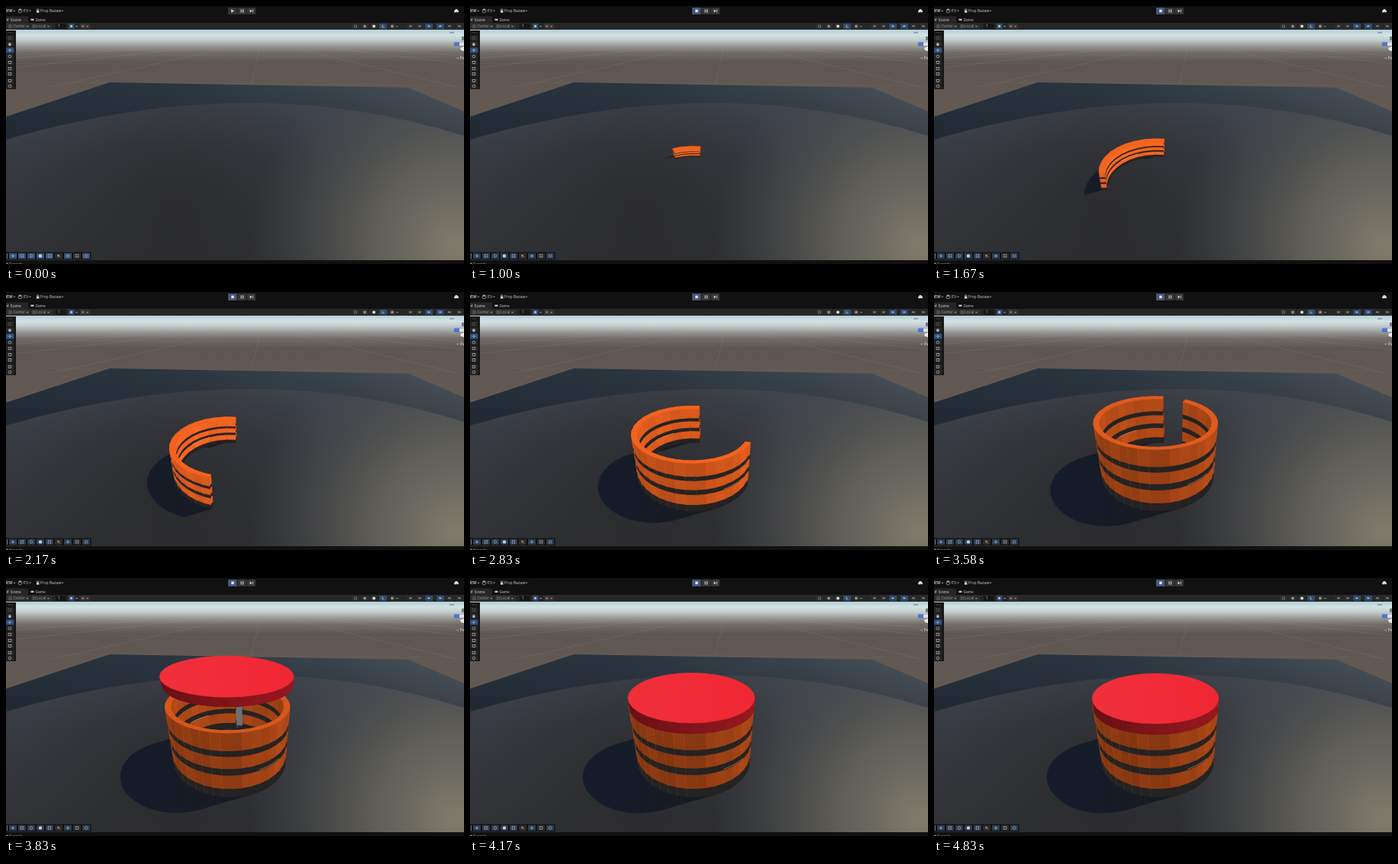
Write an HTML page with a canvas that moves like this. It is 600 px wide and 338 px high and loops after 5000 ms.

```html
<!DOCTYPE html>
<html lang="en">
<head>
<meta charset="utf-8">
<title>Ring builder</title>
<style>
  html, body { margin: 0; width: 100%; height: 100%; overflow: hidden; background: #111; }
  canvas { display: block; width: 600px; height: 338px; }
</style>
</head>
<body>
<canvas id="stage" width="600" height="338"></canvas>
<script>
const ctx = document.getElementById('stage').getContext('2d');
const LOOP = 5000, STEP = 1000 / 12, RAD = Math.PI / 180;
const BUILD_AT = 296, BUILD_FOR = 3912, LID_FROM = .9;
const START = -7;
const BANDS = [0, .29, .38, .57, .67, .88, 1];
const mix = (a, b, p) => a + (b - a) * p;
const clamp = v => Math.max(0, Math.min(1, v));
const ease = p => (1 - Math.cos(Math.PI * clamp(p))) / 2;
const rgb = (c, m = 1) => `rgb(${c.map(v => Math.round(v * m)).join()})`;

function rect(color, x, y, w, h) {
  ctx.fillStyle = color;
  ctx.fillRect(x, y, w, h);
}

function poly(color, points, seam = true) {
  ctx.beginPath();
  points.forEach(p => ctx.lineTo(p[0], p[1]));
  ctx.closePath();
  ctx.fillStyle = color;
  ctx.fill();
  if (seam) {
    ctx.strokeStyle = color;
    ctx.lineWidth = .5;
    ctx.stroke();
  }
}

function line(color, width, ...points) {
  ctx.strokeStyle = color;
  ctx.lineWidth = width;
  ctx.beginPath();
  points.forEach(p => ctx.lineTo(p[0], p[1]));
  ctx.stroke();
}

function dot(color, x, y, r) {
  ctx.fillStyle = color;
  ctx.beginPath();
  ctx.arc(x, y, r, 0, 7);
  ctx.fill();
}

function label(text, x, y, size = 5, color = '#c4c4c4', weight = 400) {
  ctx.font = `${weight} ${size}px Inter, Roboto, sans-serif`;
  ctx.fillStyle = color;
  ctx.fillText(text, x, y);
}

function fade(gradient, stops) {
  stops.forEach(([at, color]) => gradient.addColorStop(at, color));
  return gradient;
}

const caret = (x, y) => poly('#999', [[x, y], [x + 3, y], [x + 1.5, y + 1.8]], false);

function scenery() {
  rect(fade(ctx.createLinearGradient(0, 31, 0, 110), [
    [0, '#b4cfd5'], [.09, '#d3e3e5'], [.17, '#c3cdcd'], [.27, '#999a97'],
    [.38, '#716c68'], [.54, '#5d5652'], [1, '#625953']]), 0, 31, 600, 150);

  for (const x of [-520, -220, 60, 320, 590, 860, 1130])
    line('rgba(160,155,148,.25)', .7, [mix(x, 335, .82), 56], [x, 106]);
  for (const y of [64, 76, 101]) line('rgba(160,155,148,.13)', .6, [0, y - 1], [600, y + 3]);

  const plane = [[0, 145], [136, 100], [527, 107], [600, 138], [600, 200], [0, 200]];
  poly(fade(ctx.createLinearGradient(0, 0, 600, 0), [
    [0, '#26313c'], [.35, '#2b3540'], [.75, '#3c464f'], [1, '#4e555c']]), plane, false);
  poly(fade(ctx.createLinearGradient(0, 100, 0, 165), [
    [0, 'rgba(24,32,42,0)'], [1, 'rgba(20,26,36,.3)']]), plane, false);

  ctx.save();
  ctx.beginPath();
  ctx.moveTo(0, 175);
  ctx.quadraticCurveTo(320, 81.5, 600, 170);
  ctx.lineTo(600, 338);
  ctx.lineTo(0, 338);
  ctx.clip();
  rect(fade(ctx.createLinearGradient(0, 125, 0, 335), [
    [0, '#40454d'], [.35, '#373a40'], [1, '#303134']]), 0, 120, 600, 218);
  rect(fade(ctx.createRadialGradient(225, 270, 10, 225, 270, 210), [
    [0, 'rgba(40,40,42,.7)'], [1, 'rgba(40,40,42,0)']]), 0, 120, 600, 218);
  rect(fade(ctx.createRadialGradient(590, 315, 10, 590, 315, 270), [
    [0, 'rgba(130,125,108,.95)'], [.4, 'rgba(112,109,99,.7)'],
    [.75, 'rgba(88,89,88,.35)'], [1, 'rgba(80,82,84,0)']]), 0, 120, 600, 218);
  ctx.restore();
}

// Point on the ring: angle from the back going left, height 0..1, radius
function spot(deg, k, r = 1) {
  const a = deg * RAD;
  return [mix(293, 290, k) - mix(73, 82, k) * r * Math.sin(a),
          mix(240, 167, k) - mix(47, 34, k) * r * Math.cos(a)];
}

function wall(a, b, ra, rb, top, tint, shade) {
  for (let i = 0; i < 6; i++) {
    const hi = top * (1 - BANDS[i]), lo = top * (1 - BANDS[i + 1]);
    poly(i % 2 ? '#242222' : rgb(tint, shade),
      [spot(a, hi, ra), spot(b, hi, rb), spot(b, lo, rb), spot(a, lo, ra)]);
  }
}

function segment([a, b], top, light, end) {
  const tint = [242, 100, 32];
  const mid = (a + b) / 2, c = Math.cos(mid * RAD), s = Math.sin(mid * RAD);
  const ripple = Math.sin(mid * 2.7) * .025;
  const inner = () => wall(a, b, .91, .91, top, tint, light + .1 + ripple + .05 * s);
  const outer = () => {
    wall(a, b, 1, 1, top, tint, light + ripple + Math.max(0, -s) * .15);
    line('rgba(255,150,60,.22)', .5, spot(a, top), spot(a, 0));
  };
  const cap = () => wall(b, b, 1, .91, top, tint, light + .05);
  const last = b === end && end < 360 + START;
  if (last && mid > 180) cap();
  if (c > 0) { outer(); inner(); } else { inner(); outer(); }
  poly(rgb(tint, mix(.65, 1, light)),
    [spot(a, top), spot(b, top), spot(b, top, .91), spot(a, top, .91)]);
  poly(rgb(tint, Math.min(1, light + .3)),
    [spot(a, top), spot(b, top), spot(b, top, .91), spot(a, top, .91)]);
  if (last && mid <= 180) cap();
}

function glint(from, to, k, r, end) {
  const pts = [];
  for (let a = from; a <= Math.min(to, end); a += 4) pts.push(spot(a, k, r));
  if (pts.length > 1) line('rgba(255,190,140,.55)', .8, ...pts);
}

function barrel(u) {
  const grown = ease(u), rise = mix(.1, 1, grown);
  const top = rise * mix(.87, 1, rise), end = START + 360 * grown;
  const light = mix(.92, .56, grown ** 3), parts = [];
  for (let a = START; a < end - .01; a += 10) parts.push([a, Math.min(a + 10, end)]);

  const drift = ([x, y]) => [x - 72 * top, y + 21 * top];
  const dark = fade(ctx.createLinearGradient(150, 0, 300, 0), [[0, '#141c2b'], [1, '#171a22']]);
  for (const [a, b] of parts) {
    const p = spot(a, 0), q = spot(b, 0);
    poly(dark, [p, q, drift(q), drift(p)]);
  }

  // Lit ground behind the closing gap
  if (u >= LID_FROM) rect('#6b7176', 299, 166, 14, 27);
  const depth = p => Math.cos((p[0] + p[1]) / 2 * RAD);
  parts.sort((p, q) => depth(q) - depth(p));
  parts.filter(p => depth(p) > 0).forEach(p => segment(p, top, light, end));
  glint(22, 46, top * .33, .91, end);
  parts.filter(p => depth(p) <= 0).forEach(p => segment(p, top, light, end));
  glint(212, 242, top * .35, 1, end);
}

function ring(cx, cy, rx, ry) {
  return Array.from({ length: 32 }, (_, i) => {
    const a = i / 32 * 2 * Math.PI;
    return [cx + rx * Math.cos(a), cy + ry * Math.sin(a)];
  });
}

function lid(u) {
  const p = ease((u - LID_FROM) / (1 - LID_FROM));
  const upper = ring(mix(289, 290, p), mix(129, 158, p), mix(88, 83, p), mix(27, 33, p));
  const lower = ring(mix(290, 290.5, p), mix(141, 171, p), mix(85.5, 81.5, p), mix(27.5, 34, p));
  poly('#7d141b', lower);
  for (let i = 0; i < 16; i++)
    poly(rgb([150, 24, 31], .84 + .16 * Math.cos(i * .2)),
      [upper[i], upper[i + 1], lower[i + 1], lower[i]]);
  poly(fade(ctx.createLinearGradient(200, 0, 378, 0), [[0, '#f0303b'], [1, '#f02733']]), upper);
}

function topBar(playing) {
  rect('#111', 0, 0, 600, 31);
  rect('#262626', 0, 13.5, 29, 9);
  rect('#262626', 0, 22, 600, 9);
  label('IEW', 0, 8.3, 4.6, '#ccc', 600);
  caret(9.5, 5.8);
  dot('#ccc', 18.5, 5, 1.1);
  ctx.strokeStyle = '#ccc';
  ctx.lineWidth = .6;
  ctx.beginPath();
  ctx.arc(18.5, 6.3, 2.5, 0, 7);
  ctx.stroke();
  label('EV', 23, 8.3);
  caret(30, 5.8);
  rect('#ccc', 40, 5.5, 3.4, 3.2);
  line('#ccc', .6, [40.6, 5.5], [40.6, 4], [42.8, 4], [42.8, 5.5]);
  label('Prop Bazaar', 45, 8.3, 4.8);
  caret(72.5, 5.8);

  rect('#353535', 291, 2, 36, 9);
  if (playing) {
    rect('#40597a', 291, 2, 11.5, 9);
    rect('#e2e8ee', 295.2, 4.7, 3.5, 3.5);
  } else poly('#d0d0d0', [[295, 4.2], [295, 8.8], [299, 6.5]], false);
  rect('#d0d0d0', 307.5, 4.4, 1.2, 4.2);
  rect('#d0d0d0', 310, 4.4, 1.2, 4.2);
  poly('#d0d0d0', [[319.5, 4.4], [319.5, 8.6], [322.5, 6.5]], false);
  rect('#d0d0d0', 322.8, 4.4, .9, 4.2);
  rect('#111', 302.6, 2, .6, 9);
  rect('#111', 314.8, 2, .6, 9);
  dot('#ddd', 588.5, 7, 1.5);
  dot('#ddd', 590, 6, 2);
  dot('#ddd', 591.6, 7, 1.4);

  label('#', .8, 19.6, 4.8);
  label('Scene', 5.5, 19.6, 4.8, '#d4d4d4');
  rect('#bbb', 32.5, 16.7, 4, 2.4);
  label('Game', 38.5, 19.6, 4.8);

  rect('#303030', 1, 23, 30, 7);
  rect('#303030', 33, 23, 27, 7);
  ctx.strokeStyle = '#888';
  ctx.lineWidth = .6;
  ctx.strokeRect(4, 25, 3, 3);
  label('Center', 9.5, 28.4, 4.8, '#959595');
  caret(26.5, 26);
  ctx.strokeStyle = '#888';
  ctx.strokeRect(35.5, 25, 3, 3);
  label('Local', 40, 28.4, 4.8, '#959595');
  caret(54, 26);
  rect('#171717', 65, 23.4, 14, 6.4);
  label('1', 68, 28.4, 4.8, '#aaa');
  rect('#2f4a70', 82, 23, 7.5, 7);
  rect('#9fb2cb', 84, 25, 3, 3);
  caret(91, 26);
  rect('#333', 97, 23, 13, 7);
  rect('#95604f', 99, 25, 3.2, 3);
  caret(105, 26);
  for (const x of [458, 470, 482, 494, 506, 530, 542, 554, 569, 581, 594]) {
    const blue = x === 494 || x === 554 || x === 569;
    rect(blue ? '#2f4a70' : '#2c2c2c', x - 5, 23, 10, 7);
    if (x < 510) dot(x === 482 ? '#ddd' : '#8c8c8c', x, 26.5, 2);
    else rect(blue ? '#9fb2cb' : '#858585', x - 1.8, 25.5, 3.4, 1.8);
  }
  dot('#2c2c2c', 458, 26.5, 1.3);
  dot('#2f4a70', 495, 25.8, 1.3);
  caret(511, 26);
}

function cross(x, y, color) {
  line(color, .8, [x - 2.4, y], [x + 2.4, y]);
  line(color, .8, [x, y - 2.4], [x, y + 2.4]);
}

function icon(i, x, y, color) {
  ctx.strokeStyle = color;
  ctx.lineWidth = .7;
  if (i % 3 === 0) cross(x, y, color);
  else if (i % 3 === 1) ctx.strokeRect(x - 1.8, y - 1.6, 3.6, 3.2);
  else {
    ctx.beginPath();
    ctx.arc(x, y, 1.8, 0, 7);
    ctx.stroke();
  }
}

function overlays(t) {
  rect('#151515', 0, 32, 13, 77);
  line('#555', .6, [2, 35], [9, 35]);
  [42, 50, 58, 66, 74, 82, 89, 98, 105].forEach((y, i) => {
    rect(i === 2 ? '#29507f' : '#262626', 0, y - 3.6, 10.5, 7);
    if (i === 1) {
      dot('#b5b5b5', 5, y + .6, 1.8);
      line('#b5b5b5', .7, [4, y], [4, y - 2.2]);
      line('#b5b5b5', .7, [5.8, y], [5.8, y - 2.4]);
    } else icon([1, 0, 0, 2, 1, 1, 1, 1, 2][i], 5, y, i ? '#b5b5b5' : '#555');
  });

  rect('#101010', 0, 322.5, 111.5, 9.5);
  for (let i = 0; i < 9; i++) {
    const x = 9 + i * 12, off = i === 5 || i === 7;
    rect(off ? '#2d2d2d' : t < 100 ? '#36527a' : '#2b3d55', x - 5, 323.7, 10, 7.4);
    if (i === 3) dot('#c5ccd4', x, 327.4, 2.2);
    else if (i === 5) {
      dot(t < 100 ? '#999' : '#a08060', x - .4, 327, 1.5);
      line('#999', .7, [x + .6, 328], [x + 2, 329.4]);
    } else icon([0, 1, 2, 0, 1, 0, 0, 1, 2][i], x, 327.4, '#aab4bf');
  }
  rect('#999', 1, 324, .8, 7);
  rect('#111', 0, 333, 600, 5);
  rect('#999', .5, 336.6, 2, 1.4);
  label('Console', 4, 340, 4.6, '#aaa');

  line('#555', .8, [581, 35], [587, 35]);
  rect('#4875cf', 587, 47.5, 7, 5);
  rect('#dce2e5', 594, 48, 6, 4);
  poly('#e9edef', [[595, 55], [600, 53], [600, 59], [596, 58]], false);
  rect('#77757a', 597, 40, 3, 5);
  label('< Persp', 590, 70, 5, '#e2e2e2');
}

function draw(t) {
  const u = clamp((t - BUILD_AT) / BUILD_FOR);
  scenery();
  if (u > 0) barrel(u);
  if (u >= LID_FROM) lid(u);
  topBar(u > 0);
  overlays(t);
}

const began = performance.now();
let shown = -1;
function tick() {
  const now = Math.max(0, performance.now() - began) % LOOP;
  const step = Math.floor((now + 5) / STEP) % 60;
  if (step !== shown) draw((shown = step) * STEP);
  requestAnimationFrame(tick);
}
tick();
</script>
</body>
</html>
```
